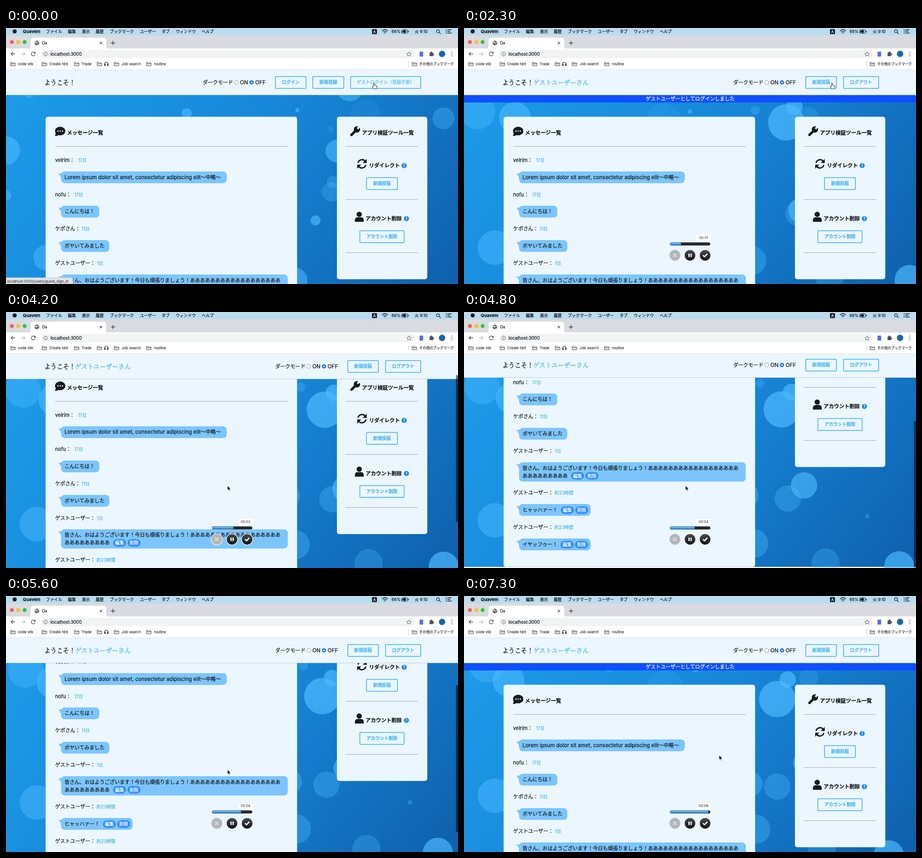
An HTML page that plays this animation: 993x564 px, repeating every 7400 ms.

```html
<!DOCTYPE html>
<html lang="ja">
<head>
<meta charset="utf-8">
<title>Oa</title>
<style>
html, body { margin: 0; width: 100%; height: 100%; overflow: hidden; background: #fff; }
svg { display: block; width: 100vw; height: 100vh; }
text { font-family: Inter, "Noto Sans CJK JP", "Noto Sans CJK", sans-serif; white-space: pre; stroke-width: .25; }
.serif { font-family: "Noto Serif CJK JP", "Noto Sans CJK JP", "Noto Sans CJK", serif; font-weight: 500; stroke-width: .4; }
</style>
</head>
<body>
<svg id="stage" viewBox="0 0 993 564" preserveAspectRatio="none"></svg>
<script>
const LOOP = 7400, LOGIN = 1000, MAX_SCROLL = 209;
const INK = '#171b20', SKY = '#50b8ec', PALE = '#ebf6fe', GREY = '#5f6368';

// Markup helpers; text is placed by its vertical centre and slightly thickened.
const text = (x, cy, str, size = 11.04, fill = INK, more = '') =>
  `<text x="${x}" y="${cy + size * .37}" font-size="${size}" fill="${fill}" stroke="${fill}" ${more}>${str}</text>`;
const rect = (x, y, w, h, fill, r = 0, more = '') =>
  `<rect x="${x}" y="${y}" width="${w}" height="${h}" rx="${r}" fill="${fill}" ${more}/>`;
const circle = (x, y, r, fill, more = '') => `<circle cx="${x}" cy="${y}" r="${r}" fill="${fill}" ${more}/>`;
const path = (d, fill, more = '') => `<path d="${d}" fill="${fill}" ${more}/>`;
const line = (d, color, width = 1.2, more = '') =>
  path(d, 'none', `stroke="${color}" stroke-width="${width}" ${more}`);
const group = (id, body) => `<g id="${id}">${body}</g>`;
const BOLD = 'font-weight="700"', MIDDLE = 'text-anchor="middle"', ROUND = 'stroke-linecap="round" stroke-linejoin="round"';

const button = (x, cy, w, label, more = '') =>
  rect(x + .9, cy - 13.1, w - 1.8, 26.2, 'none', 1.5, `stroke="${SKY}" stroke-width="1.8"`) +
  text(x + w / 2, cy - .3, label, 9.75, SKY, `${BOLD} ${MIDDLE} ${more}`);
const rule = (x1, x2, y) => line(`M${x1} ${y}H${x2}`, '#9ba8b1', 1.1);

// Floating bubbles: x, y, radius, opacity, then speed in px per second.
const beforeLogin = [
  [0, 270, 31, .6], [0, 369, 12, .5], [88, 506, 28, .5], [680, 424, 11, .65], [727, 271, 25, .6],
  [715, 361, 21, .28], [718, 339, 13, .3], [635, 555, 27, .55], [397, 188, 11, .65], [640, 181, 4.5, .65],
  [961, 199, 24, .35], [755, 130, 31, .55], [790, 190, 33, .1], [713, 222, 7, .2], [51, 143, 11, .5]
];
const afterLogin = [
  [708, 208, 40, .7, -4, 3.8], [726, 174, 18, .68, -3, 2], [757, 195, 21, .2, 0, -3],
  [30, 184, 39, .4, 4, -6.4], [112, 198, 35, .6, -2.8, -2.2], [496, 184, 5, .55, 2.4, -4.2],
  [640, 181, 10, .3, 4, -8.2], [68, 484, 38, .5, 0, -8.8], [632, 512, 32, .35, 1.8, .4],
  [979, 555, 33, .68, -9.2, 3.2], [803, 548, 31, .28, -3.4, 2.8], [742, 402, 29, .62, 2, -6.8],
  [735, 408, 29, .32, -9.4, 2.4], [882, 446, 5, .32, 1.6, 2.8], [439, 207, 40, .13, .4, -1],
  [323, 146, 7, .4, -1, 3], [612, 400, 27, .4, 3.4, 2.8]
];
const drawBubbles = list => list.map(([x, y, r, a]) => circle(x, y, r, '#4cbaff', `opacity="${a}"`)).join('');

const pill = (cx, cy, label) => rect(cx - 14.3, cy - 8.3, 28.6, 16.6, '#2f8ef6', 8.3) + text(cx, cy, label, 9.75, '#fff', MIDDLE);
const pills = (cx, cy) => pill(cx, cy, '編集') + pill(cx + 31.8, cy, '削除');
const message = (y, name, dateX, date, right, body, height = 26) =>
  text(108, y, name + '：') + text(dateX, y + .3, date, 9.75, SKY) +
  path(`M115 ${y + 29.5}Q121 ${y + 30.5} 126 ${y + 26.5}L123 ${y + 45}Q121 ${y + 36} 115 ${y + 29.5}`, '#7cc5fc') +
  rect(121, y + 25, right - 121, height, '#7cc5fc', 8) + text(128.5, y + 37.7, body);

const alertMark = (x, y) => circle(x, y, 5.6, '#1a86fb') + text(x, y, '!', 9, '#fff', `${BOLD} ${MIDDLE}`);

const messages = () =>
  rect(87, 195.5, 552.5, 578, PALE, 5) +
  `<ellipse cx="119" cy="227" rx="11.3" ry="9.6" fill="${INK}"/>` + path('M110 230L107.5 238Q113 238 117 235Z', INK) +
  [114, 119, 124].map(x => circle(x, 227, 1.5, PALE)).join('') +
  text(134, 231, 'メッセージ一覧', 11.4, INK, BOLD) + rule(108, 619, 261) +
  message(291, 'velrim', 158, '17日', 485,
    '<tspan font-size="11.6">Lorem ipsum dolor sit amet, consectetur adipiscing elit</tspan>〜中略〜') +
  message(366.6, 'nofu', 150, '17日', 205, 'こんにちは！') +
  message(442.3, 'ケポさん', 166, '11日', 227, 'ボヤいてみました') +
  message(518, 'ゲストユーザー', 199.5, '1日', 619,
    '皆さん、おはようございます！今日も頑張りましょう！' + 'あ'.repeat(18), 42.5) +
  text(128.5, 572.5, 'あ'.repeat(9)) + pills(249.5, 573) +
  message(610, 'ゲストユーザー', 199, '約23時間', 278, 'ヒャッハァー！') + pills(227, 648.5) +
  message(686, 'ゲストユーザー', 199, '約23時間', 278, 'イヤッフゥー！') + pills(226.5, 724.5);

const tools = () =>
  rect(727, 195.5, 198.5, 358, PALE, 5) +
  line('M759 235.5L769 225.5', INK, 5.4, ROUND) + circle(771, 223.5, 7, INK) + line('M772 222L780 214', PALE, 4.5) +
  text(782, 231, 'アプリ検証ツール一覧', 11.4, INK, BOLD) + rule(746, 905, 261) +
  line('M773.5 297A8.8 8.8 0 0 1 789 293.5M790.5 301.5A8.8 8.8 0 0 1 775 305', INK, 3) +
  path('M792.5 288.5V297.5H783.5ZM771.5 310V301H780.5Z', INK) +
  text(797.5, 303, 'リダイレクト', 11.3, INK, BOLD) + alertMark(874.7, 303) +
  button(791, 342.7, 70, '新規投稿') + rule(746, 905, 378) +
  circle(776, 410.5, 5.8, INK) + path('M766.5 427V423Q767 417 772 417H780Q785.5 417 786 423V427Z', INK) +
  text(790, 420, 'アカウント削除', 11.4, INK, BOLD) + alertMark(879.7, 420) +
  button(776.5, 459.7, 99, 'アカウント削除') + rule(746, 905, 495);

const flash = () => rect(0, 147.5, 993, 16.5, '#0f4fff') +
  text(497, 155.8, 'ゲストユーザーとしてログインしました', 10.9, '#fff', MIDDLE);

const radio = (x, on) => circle(x, 119.7, 4.3, on ? '#1676f3' : '#fff', `stroke="${on ? '#1676f3' : '#777'}" stroke-width=".8"`) +
  (on ? circle(x, 119.7, 1.7, '#fff') : '');
const darkMode = x => text(x, 119.8, 'ダークモード') + radio(x + 73.5, false) + text(x + 81.5, 120, 'ON', 11.8) +
  radio(x + 107, true) + text(x + 115, 120, 'OFF', 11.8);

const header = () =>
  rect(0, 92, 993, 55.5, PALE) + line('M0 147.5H993', '#b9c7d0', .8) +
  text(84, 120, 'ようこそ！', 13.7, INK, 'class="serif"') +
  group('guestNav', darkMode(432.5) + button(591, 120, 69, 'ログイン') + button(673, 120, 70, '新規登録') +
    button(756, 120, 156, 'ゲストログイン（登録不要）', 'opacity=".7"')) +
  group('userNav', text(152, 120, 'ゲストユーザーさん', 13.7, SKY, 'class="serif"') + darkMode(591.5) +
    button(750, 120, 69, '新規投稿') + button(833, 120, 79, 'ログアウト'));

const menuBar = () => {
  const items = [['ファイル', 88], ['編集', 136], ['表示', 167], ['履歴', 197], ['ブックマーク', 228],
    ['ユーザー', 294], ['タブ', 342], ['ウィンドウ', 373], ['ヘルプ', 430]];
  return rect(0, 0, 993, 16, '#b9dcee') + circle(19, 7.5, 4.6, '#1b1f23') +
    text(37, 7.8, 'Quavem', 9.5, INK, BOLD) +
    items.map(([label, x]) => text(x, 7.8, label, 8.8)).join('') +
    rect(804, 2.5, 11, 11, '#1d2226', 1.5) + text(809.5, 8, 'A', 8, '#fff', MIDDLE) +
    line('M826 6.5Q832.5 0 839 6.5M828.5 8.8Q832.5 5 836.5 8.8M831 11Q832.5 9.5 834 11', INK, 1.3) +
    text(847, 7.8, '66%', 8.8) + rect(869, 4, 13, 7.5, 'none', 1.5, `stroke="${INK}"`) + rect(870.5, 5.5, 7, 4.5, INK) +
    path('M877 2L873 8.5H876L875 13.5L880 6.5H877Z', INK) + rect(883, 6, 1.5, 3.5, INK) +
    text(898, 7.8, '火 9:10', 8.8) +
    circle(949, 7, 3.2, 'none', `stroke="${INK}" stroke-width="1.2"`) + line('M951.5 9.5L955 13', INK, 1.3) +
    line('M966 4H968M966 7.5H968M966 11H968M969.5 4H979M969.5 7.5H976M969.5 11H979', INK, 1.3);
};

const tabStrip = () =>
  rect(0, 16, 993, 30, '#d9dbe0') +
  ['#fc5b57', '#fdbc2e', '#28c840'].map((color, i) => circle(13 + 14 * i, 31, 4.4, color)).join('') +
  path('M48 46Q54 46 54 40V27Q54 21.5 60 21.5H214Q220 21.5 220 27V40Q220 46 226 46Z', '#fff') +
  circle(68, 33, 4.9, '#44484c') + path('M64 31Q68 29 68 31.5T66 34.5ZM70 29L72 32L69 33ZM68 35L71.5 34.5L69 37Z', '#fff') +
  text(79, 33.2, 'Oa', 8.4) + line('M206 30.7L211 35.7M211 30.7L206 35.7', '#33373b', 1.1) +
  line('M230.5 33H239.5M235 28.5V37.5', '#3c4043', 1.4);

const toolbar = () =>
  rect(0, 45, 993, 47, '#fff') +
  line('M20 57H11.5M15 53L11 57L15 61', '#4a4e52', 1.3) + line('M33 57H41M38 53L42 57L38 61', '#bcc0c4', 1.3) +
  line('M63.5 54.5A4.3 4.3 0 1 0 64 59', '#4a4e52', 1.3) + path('M65 52V56.5H60.5Z', '#4a4e52') +
  rect(76, 48.5, 822, 18, '#f1f3f4', 9) +
  circle(87, 57.3, 4.2, 'none', `stroke="${GREY}"`) + line('M87 56.5V59.8M87 54.5V55.6', GREY, 1) +
  text(98, 57.3, 'localhost:3000', 9.7) +
  path('M885.5 52.5L887 55.8L890.5 56.2L888 58.5L888.7 62L885.5 60.2L882.3 62L883 58.5L880.5 56.2L884 55.8Z', 'none', `stroke="${GREY}"`) +
  rect(908.5, 52, 8, 11, '#5b6bf0', 1) +
  rect(930.5, 54, 8, 8, '#505458', 1) + circle(934.5, 53.5, 1.8, '#505458') + circle(938.8, 58, 1.8, '#505458') +
  circle(958, 57, 7, '#1b66a5') + [53, 57, 61].map(y => circle(979.5, y, 1.1, '#505458')).join('');

const folder = x => path(`M${x} 75.5H${x + 4}L${x + 5} 77H${x + 10.5}V83.5H${x}Z`, '#d5d8da', `stroke="${GREY}" stroke-width=".9"`) +
  line(`M${x} 78.5H${x + 10.5}`, GREY, .8);
const bookmarks = () =>
  [10, 79, 150, 200, 237.5, 308.5, 892].map(folder).join('') +
  [['code vilk', 26], ['Create hint', 95], ['Trade', 166], ['Job search', 254], ['routine', 325], ['その他のブックマーク', 908]]
    .map(([label, x]) => text(x, 79.5, label, x > 900 ? 7.6 : 8, '#3c4043')).join('') +
  line('M217 80V79A3.5 3.5 0 0 1 224 79V80', INK, 1.2) + rect(216, 79, 2.6, 4.5, INK, 1) + rect(222.4, 79, 2.6, 4.5, INK, 1) +
  line('M884.5 73V86', '#c9ccd0', 1) + line('M0 91.7H993', '#d9dee2', .7);

const knob = (x, fill, mark) => circle(x, 500.8, 12.4, fill, 'stroke="#e6eaec" stroke-width="1.6"') +
  line(mark, fill === '#b2b6b9' ? '#d6d9db' : '#fff', 2.6);
const recorder = () =>
  rect(511, 456, 31, 12.5, '#fff', 2) + '<text id="clock" x="526.3" y="465.2" font-size="7.6" fill="#222" text-anchor="middle"></text>' +
  rect(452, 472, 89.5, 7.5, '#25292f', 3.7, 'stroke="#f0f6fa" stroke-width=".7"') +
  '<rect id="progress" x="452.5" y="473" height="5.5" rx="2.7" fill="url(#barFill)"/>' +
  knob(463.3, '#b2b6b9', 'M459.5 497L467 504.5M467 497L459.5 504.5') +
  knob(496.5, 'url(#knobFill)', 'M494.3 497V504.5M498.9 497V504.5') +
  knob(529.7, 'url(#knobFill)', 'M525 500.8L528.5 504L534.5 497.5');

const cursors = () =>
  path('M0 0V10.5L2.4 8.3L4 12L5.8 11.2L4.2 7.7H7.5Z', '#111', 'id="arrow" stroke="#fff" stroke-width=".8"') +
  path('M-1.5 0Q0 -1 1 .5V4.5Q3 3.7 3.5 5Q6 4.5 6 7Q6 10 4.5 12H-1.5L-4.5 7Q-4 5 -1.8 7Z', '#fff',
    'id="hand" stroke="#222" stroke-width="1" stroke-linejoin="round"');

const gradient = (id, direction, stops) => `<linearGradient id="${id}" ${direction}>` +
  stops.map((color, i) => `<stop offset="${i / (stops.length - 1)}" stop-color="${color}"/>`).join('') + '</linearGradient>';

const stage = document.getElementById('stage');
stage.innerHTML =
  '<defs>' + gradient('sea', 'gradientUnits="userSpaceOnUse" x1="100" y1="20" x2="890" y2="640"', ['#1d9bea', '#1786d8', '#0f62ae']) +
  gradient('barFill', 'x2="0" y2="1"', ['#7cc4f8', '#2184dc']) + gradient('knobFill', 'x2="0" y2="1"', ['#4a4c4f', '#111214']) + '</defs>' +
  group('backdrop', rect(0, 92, 993, 472.5, 'url(#sea)') +
    group('early', drawBubbles(beforeLogin)) + group('late', drawBubbles(afterLogin))) +
  group('page', group('notice', flash()) + messages() + tools()) +
  group('header', header()) +
  rect(988.5, 94, 4.5, 324, '#000', 2.2, 'id="scrollbar"') +
  menuBar() + tabStrip() + toolbar() + bookmarks() +
  group('status', path('M0 550H143Q147 550 147 554V564H0Z', '#dfe3e7', 'stroke="#b8c0c6" stroke-width=".7"') +
    text(3, 557.8, 'localhost:3000/users/guest_sign_in', 8, '#50565b')) +
  group('recorder', recorder()) + group('cursor', cursors());

const el = id => document.getElementById(id);
const show = (id, visible) => el(id).setAttribute('display', visible ? 'inline' : 'none');
const move = (id, x, y) => el(id).setAttribute('transform', `translate(${x} ${y})`);
const clamp01 = v => Math.min(1, Math.max(0, v));
const smooth = (t, from, to) => { const p = clamp01((t - from) / (to - from)); return p * p * (3 - 2 * p); };

const scrollKeys = [[4000, 0], [4650, 209], [4800, 212], [5000, 209], [5350, 209], [5600, 146], [5900, 0], [6000, -3], [6300, 0]];
function scrollAt(t) {
  const next = scrollKeys.findIndex(key => key[0] > t);
  if (next < 1) return 0;
  const [t0, s0] = scrollKeys[next - 1], [t1, s1] = scrollKeys[next];
  return s0 + (s1 - s0) * (t - t0) / (t1 - t0);
}

function drift(id, list, seconds) {
  [...el(id).children].forEach((node, i) => {
    const [, , , , vx = 1, vy = -3] = list[i];
    node.setAttribute('transform', `translate(${vx * seconds} ${vy * seconds})`);
  });
}

function render(t) {
  const loggedIn = t >= LOGIN;
  for (const id of ['late', 'notice', 'userNav']) show(id, loggedIn);
  for (const id of ['early', 'guestNav', 'status']) show(id, !loggedIn);
  if (loggedIn) drift('late', afterLogin, (t - 2300) / 1000);
  else drift('early', beforeLogin, t / 1000);

  // Past either end the whole page, header included, rubber-bands.
  const scroll = scrollAt(t), inside = Math.min(MAX_SCROLL, Math.max(0, scroll));
  move('page', 0, -scroll);
  move('header', 0, inside - scroll);
  move('backdrop', 0, inside - scroll);
  move('scrollbar', 0, inside * .697);
  el('scrollbar').setAttribute('opacity', .52 * clamp01((t - 3900) / 100) * clamp01((6900 - t) / 250));

  show('recorder', t >= 300);
  el('clock').textContent = '00:0' + Math.max(0, Math.floor((t - 700) / 1000));
  el('progress').setAttribute('width', Math.max(0, (t - 250) * .012));

  const away = smooth(t, 2700, 3500), last = smooth(t, 6300, 7100);
  move('cursor', 809 - 322.5 * away + 74 * last, 122 + 260.5 * away - 32 * last);
  show('hand', t < 2900);
  show('arrow', t >= 2900);
}

const start = performance.now();
function tick() {
  const elapsed = Math.max(0, performance.now() - start) % LOOP;
  render(Math.floor(elapsed / 100) * 100);
  requestAnimationFrame(tick);
}
tick();
</script>
</body>
</html>
```
